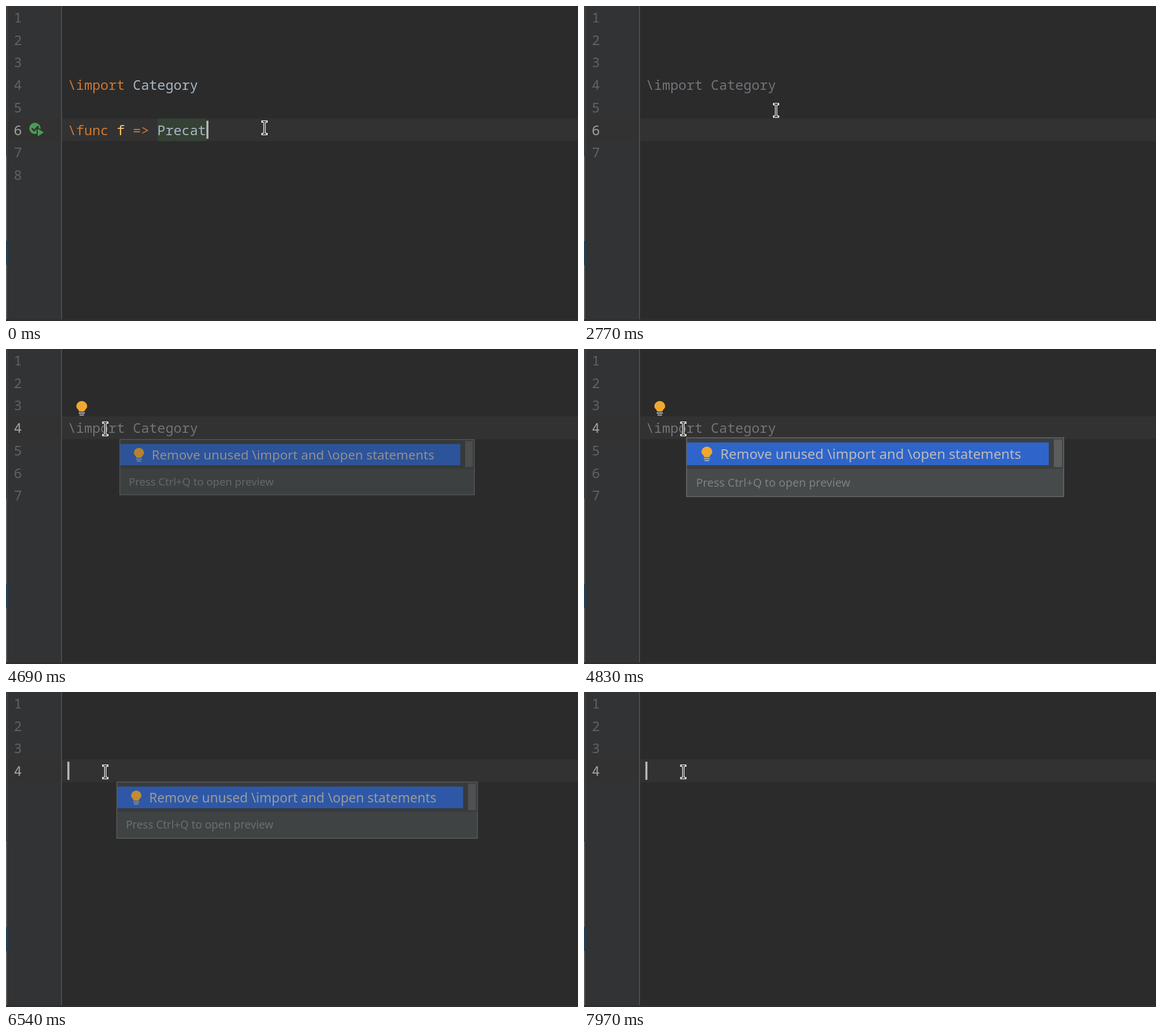
These frames come from a looping animation (1008 px wide and 556 px high, 8.33 s). An HTML page:

```html
<!DOCTYPE html>
<html lang="en">
<head>
<meta charset="utf-8">
<title>Remove unused imports</title>
<style>
  html, body { margin: 0; width: 100%; height: 100%; overflow: hidden; background: #2b2b2b; }
  svg { display: block; width: 100vw; height: 100vh; }
  text { white-space: pre; }
  .code { font: 23.88px "Noto Sans Mono", monospace; fill: #a9b7c6; }
  .keyword { fill: #cc7832; }
  .name { fill: #ffc66d; }
  .unused, .unused .keyword { fill: #72737a; }
  #numbers { fill: #606366; }
  #numbers .active { fill: #a4a3a3; }
  #popup text { font-family: "Noto Sans", "Open Sans", sans-serif; }
</style>
</head>
<body>
<svg viewBox="0 0 1008 556">
  <defs>
    <g id="bulb">
      <path d="M-4.5 8.5C-5 5-9.5 3.5-9.5-.7a9.5 9.5 0 0 1 19 0C9.5 3.5 5 5 4.5 8.5Z" fill="#f0a732"/>
      <path d="M-5.5 11h11M-4 14.5h8" stroke="#afb1b3" stroke-width="2"/>
    </g>
    <path id="beam" d="M-3.4-11H3.4M0-11V11M-3.400 11H3.400" fill="none"/>
  </defs>

  <rect width="1008" height="556" fill="#2b2b2b"/>
  <rect width="97" height="556" fill="#313335"/>
  <rect id="row" width="1008" height="40" fill="#323232"/>
  <rect x="97" width="1.5" height="556" fill="#555"/>
  <rect width="3.5" height="264" fill="#3c3f41"/>
  <rect y="264" width="2" height="292" fill="#5a5c5d"/>
  <rect y="415" width="3.5" height="42" fill="#1d4259"/>
  <rect y="553" width="1008" height="3" fill="#2f2f30"/>

  <g id="numbers" class="code"></g>
  <text id="import" class="code" x="109" y="148"><tspan class="keyword">\import</tspan> Category</text>
  <g id="func">
    <rect x="267" y="198.500" width="86.500" height="40" fill="#344134"/>
    <text class="code" x="109" y="227.500"><tspan class="keyword">\func</tspan> <tspan class="name">f</tspan> <tspan class="keyword">=&gt;</tspan> Precat</text>
  </g>
  <g id="runIcon">
    <circle cx="51" cy="216" r="10" fill="#499c54"/>
    <path d="M45.5 216l4 4 7.5-8" fill="none" stroke="#323232" stroke-width="2.8"/>
    <path d="M56 216.5v13.500l10.500-6.700Z" fill="#499c54" stroke="#323232" stroke-width="4" paint-order="stroke"/>
  </g>
  <rect id="caret" width="3.500" height="32" fill="#bbb"/>
  <use id="hintBulb" href="#bulb" x="133.5" y="102"/>

  <g id="popup">
    <rect x="180.7" y="156.7" width="664.6" height="103.8" fill="#3c3f41"/>
    <rect x="181" y="211.5" width="664" height="49" fill="#464a4b"/>
    <rect x="181" y="165" width="638" height="40" fill="#2f65ca"/>
    <rect x="828" y="159.5" width="14.5" height="49" fill="#5a5c5d"/>
    <rect x="180.7" y="156.7" width="664.6" height="103.8" fill="none" stroke="#656768" stroke-width="1.6"/>
    <use href="#bulb" x="216.5" y="182.5"/>
    <text x="240.3" y="194" font-size="24.1" fill="#bbb">Remove unused \import and \open statements</text>
    <text x="197.4" y="242.8" font-size="20" fill="#7f8080">Press Ctrl+Q to open preview</text>
  </g>

  <g id="mouse">
    <use href="#beam" stroke="#fff" stroke-width="4" stroke-linecap="square"/>
    <use href="#beam" stroke="#1c1c1c" stroke-width="1.5"/>
  </g>
</svg>
<script>
const LOOP = 8330;
const el = id => document.getElementById(id);
const show = (id, on) => el(id).setAttribute("visibility", on ? "visible" : "hidden");
const place = (id, x, y) => el(id).setAttribute("transform", `translate(${x} ${y})`);
const rowTop = line => 119 + (line - 4) * 39.75;

// Value of the last [time, value] step reached.
const stepAt = (steps, t) => steps.filter(([start]) => start <= t).pop()[1];

const CARET_ON = [[0, 1], [340, 0], [890, 1], [2400, 0], [2870, 1], [3400, 0],
  [3690, 1], [4540, 0], [6490, 1], [7460, 0], [7970, 1]];
const CARET_X = [[0, 353.2], [1510, 108.2], [3690, 179.7], [6490, 108.2]];
const LINE_COUNT = [[0, 8], [1510, 7], [6490, 4]];
const POPUP_ALPHA = [[0, 0], [4690, .7], [4710, .82], [4770, .95], [4830, 1],
  [6490, .97], [6540, .78], [6600, .45], [6660, 0]];

const numbers = Array.from({ length: 8 }, (_, i) => {
  const label = document.createElementNS("http://www.w3.org/2000/svg", "text");
  label.setAttribute("x", 13.7);
  label.setAttribute("y", rowTop(i + 1) + 29.2);
  label.textContent = i + 1;
  return el("numbers").appendChild(label);
});

function draw(t) {
  const line = t < 3690 ? 6 : 4;
  const lineCount = stepAt(LINE_COUNT, t);
  numbers.forEach((label, i) => {
    label.setAttribute("visibility", i < lineCount ? "visible" : "hidden");
    label.classList.toggle("active", i + 1 === line);
  });
  place("row", 0, rowTop(line));

  show("func", t < 1510);
  show("runIcon", t < 1600);
  show("import", t < 6490);
  el("import").classList.toggle("unused", t >= 1970);
  show("hintBulb", t >= 4460 && t < 6490);

  show("caret", stepAt(CARET_ON, t));
  place("caret", stepAt(CARET_X, t), rowTop(line) + 4);

  const progress = Math.min(1, Math.max(0, Math.floor((t - 2400) / 82) / 9));
  const eased = progress * progress * (3 - 2 * progress);
  place("mouse", 455.5 - 280.5 * eased, 215 - 74 * eased);

  const alpha = stepAt(POPUP_ALPHA, t);
  const scale = .8 + .2 * alpha;
  el("popup").setAttribute("opacity", alpha);
  el("popup").setAttribute("transform",
    `translate(512.7 208.5) scale(${scale}) translate(-512.7 -208.5)`);
}

const start = performance.now();
function tick() {
  draw((performance.now() - start) % LOOP);
  requestAnimationFrame(tick);
}
tick();
</script>
</body>
</html>
```
